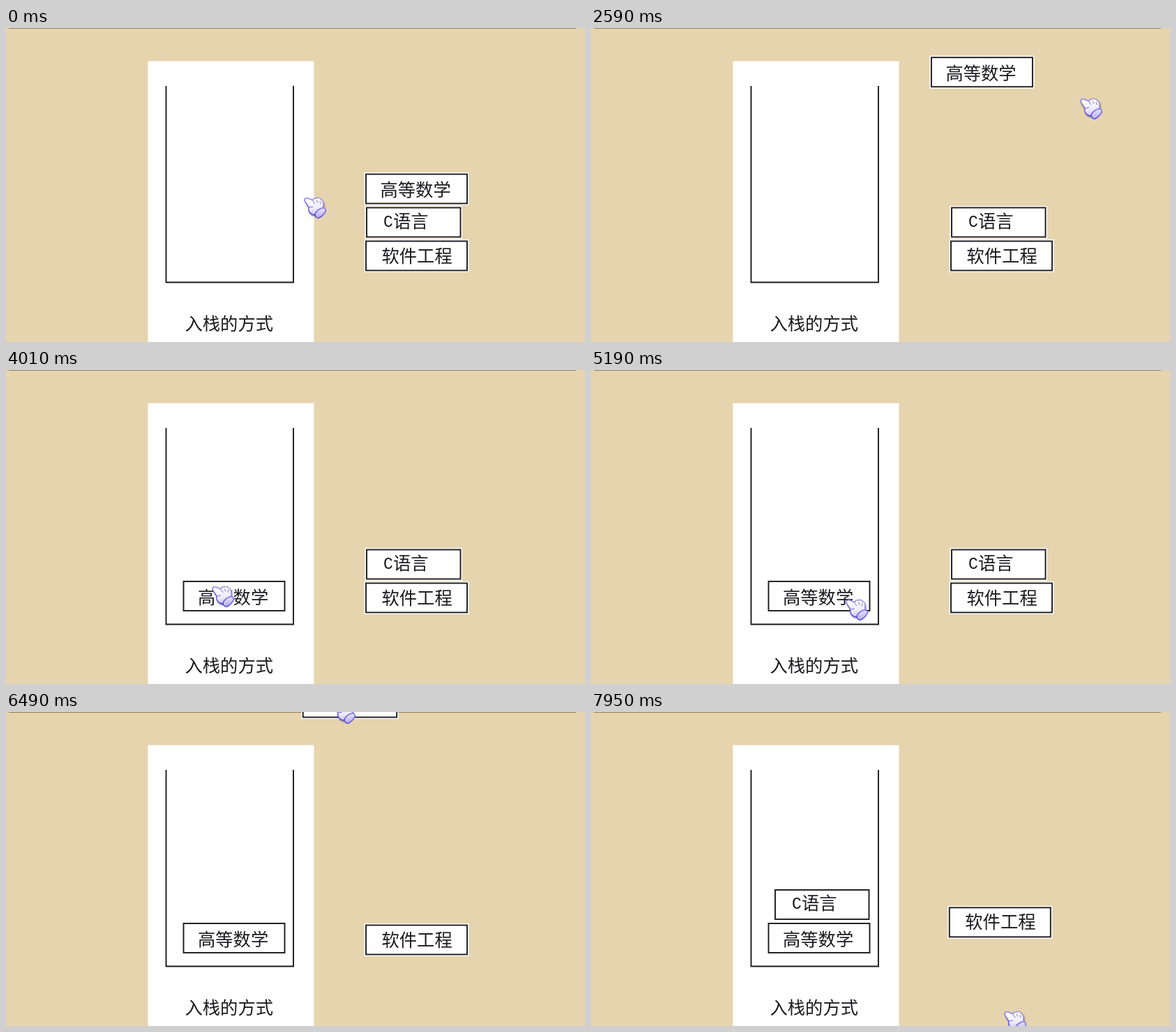
An HTML page with a canvas that plays this animation: 830x450 px, repeating every 7.99 s.

```html
<!DOCTYPE html>
<html lang="zh">
<head>
<meta charset="utf-8">
<style>
  html, body { margin: 0; width: 100%; height: 100%; overflow: hidden; background: #e6d4ae; }
  canvas { display: block; }
</style>
</head>
<body>
<canvas id="stage" width="830" height="450"></canvas>
<script>
const ctx = document.getElementById('stage').getContext('2d');
const LOOP = 7990;
const INK = '#1b1b20';
const CJK = '25.3px "Noto Sans CJK SC", "Noto Sans CJK", sans-serif';
const LATIN = '23px "Liberation Mono", monospace';
const LEAD = 255; // part of each flight already over when the box first shows movement

const boxes = [
  { text: '高等数学', width: 145, indent: 20.5, base: 31.5, home: [516, 209.5], slot: [254.5, 303], start: 2030 },
  { text: '语言', latin: 'C', width: 134.5, indent: 38, base: 28, home: [517, 257.5], slot: [264, 255], start: 5590 },
  { text: '软件工程', width: 145, indent: 22.5, base: 30, home: [516, 305.5], slot: [258, 206], start: 7950 }
];

// Resting points of the hand: time, x, y.
const stops = [
  [0, 428, 242], [650, 400, 334], [1300, 332, 244], [1800, 702, 100], [3000, 702, 100],
  [4010, 296, 309], [5190, 366, 328], [5300, 432, 420], [5600, 432, 420],
  [6490, 470, -14], [7780, 593, 428]
];

const smooth = u => u * u * (3 - 2 * u);
const mix = (a, b, u) => a + (b - a) * u;
const shift = ([x, y], dx, dy) => [x + dx, y + dy];

function segment(times, t) {
  let i = 0;
  while (i < times.length - 2 && t >= times[i + 1]) i++;
  const span = times[i + 1] - times[i];
  return { i, span, u: Math.min(1, (t - times[i]) / span) };
}

function spline(times, values, t) {
  const { i, span, u } = segment(times, t);
  const last = times.length - 1;
  const slope = k => k === 0 || k === last ? 0 :
    (values[k + 1] - values[k - 1]) / (times[k + 1] - times[k - 1]);
  const v = 1 - u;
  return mix(values[i], values[i + 1], smooth(u)) +
    span * u * v * (v * slope(i) - u * slope(i + 1));
}

// Every box rises from home, arches over the wall and sinks into its slot.
function boxPosition({ home, slot, start }, t) {
  if (t < start) return home;
  const times = [0, 560, 900, 1350, 1850].map((ms, i) => i ? ms + LEAD : 0);
  const path = [home, shift(home, -28, -167), shift(home, -91, -292), shift(slot, -12, -150), slot];
  return [0, 1].map(axis => spline(times, path.map(p => p[axis]), t - start + LEAD));
}

function handPosition(t) {
  const { i, u } = segment(stops.map(s => s[0]), t);
  return [1, 2].map(axis => mix(stops[i][axis], stops[i + 1][axis], smooth(u)));
}

function write(text, x, y, font) {
  ctx.font = font;
  ctx.fillStyle = INK;
  ctx.fillText(text, x, y);
}

function drawScene() {
  ctx.fillStyle = '#e6d4ae';
  ctx.fillRect(0, 0, 830, 450);
  ctx.fillStyle = '#927f5b';
  ctx.fillRect(4, 0, 813, 1);
  ctx.fillStyle = '#fff';
  ctx.fillRect(203.5, 47.5, 238, 403);
  ctx.strokeStyle = INK;
  ctx.lineWidth = 1.9;
  ctx.beginPath();
  ctx.moveTo(229.5, 83);
  ctx.lineTo(229.5, 364.5);
  ctx.lineTo(412, 364.5);
  ctx.lineTo(412, 83);
  ctx.stroke();
  write('入栈的方式', 256.5, 432.8, CJK);
}

function drawBox(box, t) {
  const [x, y] = boxPosition(box, t);
  ctx.fillStyle = '#fff';
  ctx.fillRect(x - 2.5, y - 2.5, box.width + 5, 47);
  ctx.strokeStyle = INK;
  ctx.lineWidth = 1.9;
  ctx.strokeRect(x, y, box.width, 42);
  if (box.latin) write(box.latin, x + 24, y + 27, LATIN);
  write(box.text, x + box.indent, y + box.base, CJK);
}

const palm = new Path2D('M0 5 Q0 1 5 2 L12 5 Q13 1 17 2 Q21 0 24 4 Q28 7 27 12 Q28 15 26 18 L17 25 Q11 27 8 23 Q5 20 6 15 L2 9 Z');
const cuff = new Path2D('M15 25 Q17 19 25 16 Q30 15 30.5 20 Q28 26 21 30 Q16 31 15 25 Z');
const creases = new Path2D('M12 6 L15 10 M17 4.5 L19 8.5 M22 6 L23 10 M7 15 L12 14');

function drawHand(t) {
  ctx.save();
  ctx.translate(...handPosition(t));
  ctx.lineJoin = 'round';
  ctx.shadowColor = 'rgba(50, 40, 60, .7)';
  ctx.shadowBlur = 3;
  ctx.shadowOffsetX = 1;
  ctx.shadowOffsetY = 2;
  const fill = ctx.createLinearGradient(12, 2, 18, 31);
  fill.addColorStop(0, '#fff');
  fill.addColorStop(0.5, '#eeebfb');
  fill.addColorStop(1, '#b3aaf0');
  const outline = ctx.createLinearGradient(18, 0, 10, 26);
  outline.addColorStop(0, '#a39bdf');
  outline.addColorStop(1, '#5546e6');
  ctx.fillStyle = fill;
  ctx.strokeStyle = outline;
  ctx.lineWidth = 1.5;
  for (const shape of [palm, cuff]) {
    ctx.fill(shape);
    ctx.shadowColor = 'transparent';
    ctx.stroke(shape);
  }
  ctx.lineWidth = 1.1;
  ctx.stroke(creases);
  ctx.restore();
}

function frame(now) {
  const t = now % LOOP;
  drawScene();
  boxes.forEach(box => drawBox(box, t));
  drawHand(t);
  requestAnimationFrame(frame);
}
requestAnimationFrame(frame);
</script>
</body>
</html>
```
